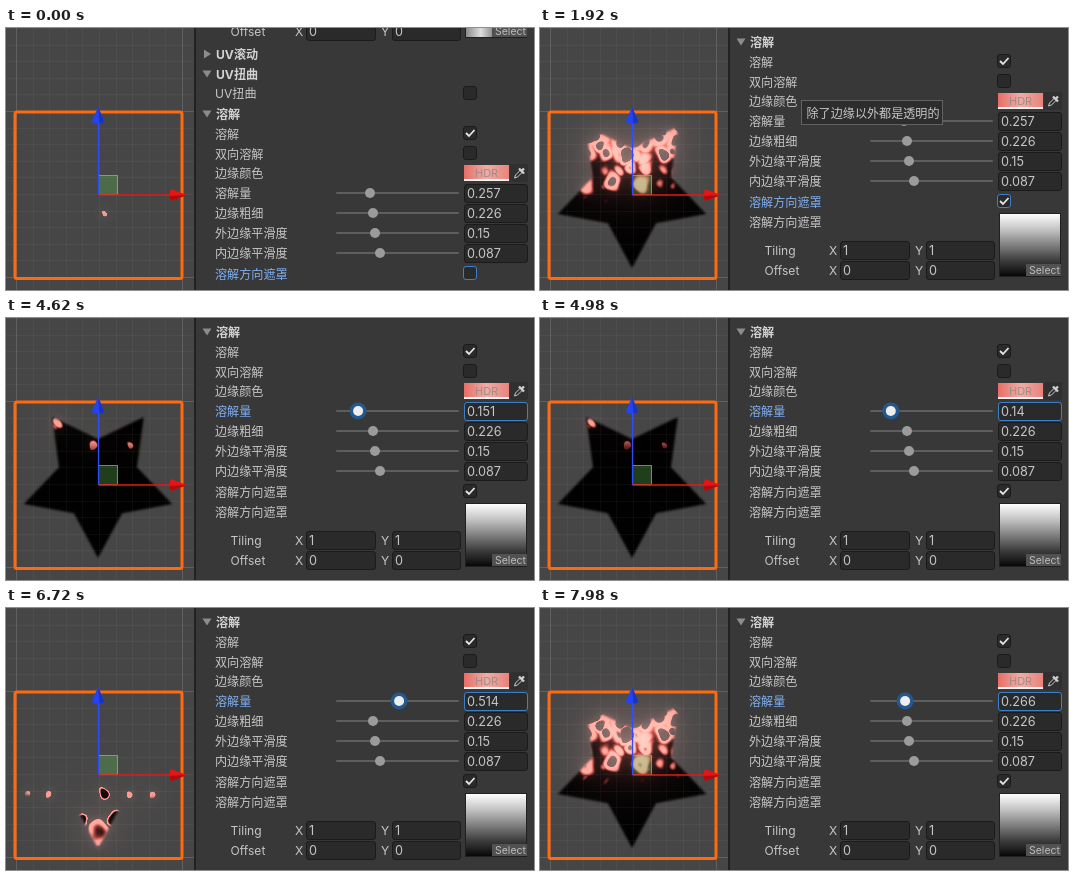
An HTML page with a canvas that plays this animation: 528 px wide and 262 px high, repeating every 8 s.

```html
<!DOCTYPE html>
<html lang="zh">
<head>
<meta charset="utf-8">
<style>
html, body { margin: 0; width: 100%; height: 100%; overflow: hidden; background: #383838; }
canvas, svg { position: absolute; left: 0; top: 0; display: block; }
text {
  font: 12.1px Inter, "Noto Sans CJK SC", "Noto Sans CJK", sans-serif;
  fill: #c6c6c6; dominant-baseline: central; white-space: pre;
}
.val { font-size: 12.7px; }
.head { font-weight: 700; fill: #d2d2d2; }
.blue { fill: #7fb0f5; }
.small { font-size: 10.5px; fill: #bdbdbd; }
.hdr { font-size: 11px; fill: #a08c89; }
.box { fill: #2a2a2a; stroke: #1b1b1b; }
.hover { stroke: #6a6a6a; }
.focus { stroke: #3d80c8; }
.tick { fill: none; stroke: #e6e6e6; stroke-width: 1.8; }
.track { fill: #5e5e5e; }
.knob { fill: #9b9b9b; }
.on .knob { fill: #eee; }
.halo { fill: #24598f; visibility: hidden; }
.on .halo { visibility: visible; }
</style>
</head>
<body>
<canvas id="scene" width="188" height="262"></canvas>
<svg id="ui" width="528" height="262" viewBox="0 0 528 262"></svg>
<script>
const LOOP = 8000, STEP = 60, SHIFT = 72;
const CHECK_AT = 720, SCROLL_AT = 1680, DRAG_AT = 3720;
// time and value at the turns of the slider drag
const DRAG = [
  [0, .257], [3720, .257], [3840, .239], [4260, .22], [4620, .151], [4860, .1], [5160, .2],
  [5460, .646], [6000, .86], [6300, .86], [6720, .514], [7380, .21], [7740, .21], [7980, .266], [8000, .266]
];
const TWO_SIDED = '除了边缘以外都是透明的', OUTER = '边缘向外过渡的平滑度';
const TIPS = [
  { from: 1260, to: 1380, x: 226, y: 144, s: TWO_SIDED },
  { from: 1920, to: 3120, x: 261, y: 72, s: TWO_SIDED },
  { from: 3240, to: 3540, x: 203, y: 152, s: OUTER }
];
const $ = id => document.getElementById(id);

// ---- inspector ----
const text = (x, y, s, cls = '', id = '') =>
  `<text x="${x}" y="${y}" class="${cls}" ${id && `id="${id}"`}>${s}</text>`;
const box = (x, y, w, h, id = '') =>
  `<rect x="${x + .5}" y="${y + .5}" width="${w - 1}" height="${h - 1}" rx="2.5" class="box" ${id && `id="${id}"`}/>`;
const check = (y, on) => box(457, y - 8, 14, 14, 'c' + y) +
  `<path id="t${y}" class="tick" d="M460 ${y - 1}l3 3 5.5-6" visibility="${on ? 'visible' : 'hidden'}"/>`;
const field = (y, v) => box(458, y - 9, 64, 19, 'f' + y) + text(461, y + .5, v, 'val', 'v' + y);
const slider = (y, x, v) =>
  `<rect x="330" y="${y - 1}" width="123" height="2" rx="1" class="track"/>
   <g id="s${y}" transform="translate(${x} ${y})"><circle r="8.5" class="halo"/><circle r="5" class="knob"/></g>` + field(y, v);
const label = (y, s) => text(209, y, s, '', 'l' + y);
const fold = (y, s, open) =>
  `<path fill="#8c8c8c" d="${open ? `M196.500 ${y - 3.500}h9l-4.500 7z` : `M198 ${y - 4.500}v9l7-4.500z`}"/>` + text(210, y, s, 'head');
const vec = (y, name, v) => text(224.5, y, name) + text(289, y, 'X') + box(300, y - 9, 70, 19) + text(303, y, v, 'val') +
  text(375, y, 'Y') + box(386, y - 9, 69, 19) + text(389, y, v, 'val');
const thumb = (y, fill) =>
  `<rect x="459.500" y="${y + .5}" width="61" height="63" fill="${fill}" stroke="#202020"/>
   <rect x="486" y="${y + 51}" width="35" height="12" fill="#515151"/>` + text(489, y + 57, 'Select', 'small');

const panel = `
<rect x="188" width="340" height="262" fill="#383838"/>
<rect x="188" width="2" height="262" fill="#222"/>
<g id="list">
  ${vec(-69, 'Offset', 0)} ${thumb(-126, 'url(#cloud)')}
  ${fold(-46, 'UV滚动', false)} ${fold(-26, 'UV扭曲', true)}
  ${label(-7, 'UV扭曲')} ${check(-6, false)}
  ${fold(14, '溶解', true)}
  ${label(34, '溶解')} ${check(34, true)}
  ${label(54, '双向溶解')} ${check(54, false)}
  ${label(73, '边缘颜色')}
  <rect x="458" y="65" width="45" height="16" fill="url(#hot)"/>
  <rect x="458" y="79" width="45" height="2" fill="#f4f4f4"/>
  ${text(469, 73, 'HDR', 'hdr')}
  <rect x="504" y="64" width="18" height="18" rx="2" fill="#303030"/>
  <path d="M508.500 78l1-3 5-5 2 2-5 5z" fill="none" stroke="#c8c8c8"/>
  <path d="M513 68.500l5 5M515.500 71l2.500-2.500" stroke="#d0d0d0" stroke-width="2.400"/>
  ${label(93, '溶解量')} ${slider(93, 364, '0.257')}
  ${label(113, '边缘粗细')} ${slider(113, 367, '0.226')}
  ${label(133, '外边缘平滑度')} ${slider(133, 369, '0.15')}
  ${label(153, '内边缘平滑度')} ${slider(153, 374, '0.087')}
  ${label(174, '溶解方向遮罩')} ${check(174, false)}
  <g id="mask">
    ${label(194, '溶解方向遮罩')}
    ${vec(222, 'Tiling', 1)} ${vec(242, 'Offset', 0)} ${thumb(185, 'url(#ramp)')}
  </g>
</g>
<g id="tip"><rect id="tipBox" height="24" fill="#2d2d2d" stroke="#626262"/>${text(5, 12.5, '', '', 'tipText')}</g>`;

const gizmo = `
<rect x="9" y="84" width="167" height="166.500" rx="2" fill="none" stroke="#ff6a10" stroke-width="3"/>
<rect x="92.500" y="147.500" width="19" height="19" fill="#5cb050" fill-opacity=".34" stroke="#8cc47c" stroke-opacity=".7"/>
<path d="M92.500 95V167" stroke="#2b4cff" stroke-width="1.300"/>
<path d="M92.500 167H164" stroke="#e01818" stroke-width="1.300"/>
<path d="M92 79l6.500 15q-6.500 3-13 0z" fill="#2444f4"/><path d="M92 79l6.500 15q-3 1.500-5 1.500z" fill="#1a34c0"/>
<path d="M181 167l-16 6q-3-6 0-12z" fill="#e61414"/><path d="M181 167l-16 6q-1.500-3-1.500-5z" fill="#b00c0c"/>`;

const grad = (id, dir, ...stops) => `<linearGradient id="${id}" ${dir}>` +
  stops.map((c, i) => `<stop offset="${i / (stops.length - 1)}" stop-color="${c}"/>`).join('') + '</linearGradient>';
$('ui').innerHTML = '<defs>' +
  grad('ramp', 'x1="0" x2="0" y1="0" y2="1"', '#fff', '#c4c4c4', '#808080', '#3c3c3c', '#060606') +
  grad('hot', 'x2="1"', '#e66e66', '#efaca5', '#e8837b') +
  grad('cloud', 'x2="1"', '#888', '#ddd', '#777', '#bbb', '#666') + '</defs>' + panel + gizmo;

// ---- dissolving star ----
const X0 = 12, Y0 = 94, W = 160, H = 152, BASE = .58;
let seed = 11;
const random = () => (seed = seed * 16807 % 2147483647) / 2147483647;

// cells that burn through first: jittered grid plus a few deep ones
const pits = [
  { x: 51, y: 105, r: 5, a: .56 }, { x: 86, y: 127, r: 5, a: .72 }, { x: 123, y: 126, r: 4, a: .66 },
  { x: 72, y: 155, r: 7, a: .64 }, { x: 101, y: 157, r: 8, a: .54 }, { x: 46, y: 160, r: 8, a: .54 }
];
for (let y = Y0; y < Y0 + H; y += 15)
  for (let x = X0; x < X0 + W; x += 15)
    pits.push({ x: x + 9 * random(), y: y + 9 * random(), r: 4 + 1.5 * random(), a: .25 + .2 * random() });

// spots that last longest
const peaks = [
  { x: 97, y: 185, r: 5, a: 1.4 }, { x: 108, y: 209, r: 6, a: 1.24 },
  { x: 76, y: 211, r: 5, a: 1.17 }, { x: 92, y: 222, r: 12, a: .8 }
].concat([20, 41, 122, 145].map(x => ({ x, y: 185, r: 5, a: .95 })));

const strongest = (list, x, y) => list.reduce((m, p) =>
  Math.max(m, p.a * Math.exp(-((x - p.x) ** 2 + ((y - p.y) * .85) ** 2) / (2 * p.r * p.r))), 0);
const noise = Float32Array.from({ length: W * H }, (_, i) => {
  const px = X0 + i % W, py = Y0 + Math.floor(i / W);
  const x = px + 1.2 * Math.sin(py * .33), y = py + 1.2 * Math.sin(px * .29);
  return Math.max(BASE - strongest(pits, x, y), strongest(peaks, x, y));
});

const star = new Path2D();
for (let k = 0; k < 10; k++) {
  const r = k % 2 ? 41 : 78, a = Math.PI / 2 + k * Math.PI / 5;
  star.lineTo(92 - X0 + r * Math.cos(a), 162 - Y0 + r * Math.sin(a));
}
star.closePath();

const layer = document.createElement('canvas');
layer.width = W; layer.height = H;
const lc = layer.getContext('2d'), img = lc.createImageData(W, H);
const ctx = $('scene').getContext('2d');
const smooth = (a, b, x) => {
  const t = Math.min(1, Math.max(0, (x - a) / (b - a)));
  return t * t * (3 - 2 * t);
};

function drawStar(amount, masked) {
  for (let i = 0; i < noise.length; i++) {
    const y = Math.max(108, Y0 + Math.floor(i / W));
    const d = noise[i] - (masked ? .232 + 4 * amount - .008 * y : 1.25);
    const h = 1 - smooth(.12, .32, d), soft = h ** 1.5;
    img.data.set([250 * h, 150 * soft, 140 * soft, 250 * smooth(-.02, .04, d)], i * 4);
  }
  lc.globalCompositeOperation = 'source-over';
  lc.putImageData(img, 0, 0);
  lc.globalCompositeOperation = 'destination-in';
  lc.filter = 'blur(.8px)';
  lc.fill(star);
  lc.filter = 'none';
  ctx.drawImage(layer, X0, Y0);
  // bloom
  ctx.globalCompositeOperation = 'lighter';
  for (const [blur, alpha] of [[4, .2], [14, .3], [34, .35]]) {
    ctx.filter = `blur(${blur}px)`;
    ctx.globalAlpha = alpha;
    ctx.drawImage(layer, X0, Y0);
  }
  ctx.filter = 'none';
  ctx.globalAlpha = 1;
  ctx.globalCompositeOperation = 'source-over';
}

function drawGrid() {
  for (let k = -6; k < 12; k++) {
    ctx.fillStyle = `rgba(255,255,255,${k % 10 ? .04 : .14})`;
    ctx.fillRect(Math.round(10 + k * 16.6), 0, 1, 262);
    ctx.fillRect(0, Math.round(83 + k * 16.6), 188, 1);
  }
}

// ---- timeline ----
function amountAt(t) {
  const i = DRAG.findIndex(k => k[0] > t);
  const [t0, a] = DRAG[i - 1], [t1, b] = DRAG[i];
  return a + (b - a) * (t - t0) / (t1 - t0);
}
// the pointer crosses three fields on its way down, later one checkbox
function hoverAt(t) {
  if (t >= 180 && t < 420) return 'f' + (113 + 20 * Math.floor((t - 180) / 80));
  return t >= 2460 && t < 2580 ? 'c54' : '';
}
const show = (id, on) => $(id).setAttribute('visibility', on ? 'visible' : 'hidden');

function render(t) {
  const v = amountAt(t), masked = t >= CHECK_AT, drag = t >= DRAG_AT;
  ctx.fillStyle = '#464646';
  ctx.fillRect(0, 0, 188, 262);
  drawStar(v, masked);
  drawGrid();

  $('list').setAttribute('transform', `translate(0 ${t < SCROLL_AT ? SHIFT : 0})`);
  show('mask', masked);
  show('t174', masked);
  $('l174').classList.toggle('blue', !drag);
  $('c174').classList.toggle('focus', !drag);
  $('l93').classList.toggle('blue', drag);
  $('f93').classList.toggle('focus', drag);
  $('s93').classList.toggle('on', drag);
  $('s93').setAttribute('transform', `translate(${(335 + 113 * v).toFixed(1)} 93)`);
  $('v93').textContent = +v.toFixed(3);
  const hover = hoverAt(t);
  for (const b of document.querySelectorAll('.box')) b.classList.toggle('hover', !!hover && b.id === hover);

  const tip = TIPS.find(p => t >= p.from && t < p.to);
  show('tip', tip);
  if (tip) {
    $('tip').setAttribute('transform', `translate(${tip.x + .5} ${tip.y + .5})`);
    $('tipBox').setAttribute('width', 9 + 12 * tip.s.length);
    $('tipText').textContent = tip.s;
  }
}

const start = performance.now();
let last = -1;
function tick() {
  const t = Math.floor((performance.now() - start) % LOOP / STEP) * STEP;
  if (t !== last) render(last = t);
  requestAnimationFrame(tick);
}
tick();
</script>
</body>
</html>
```
